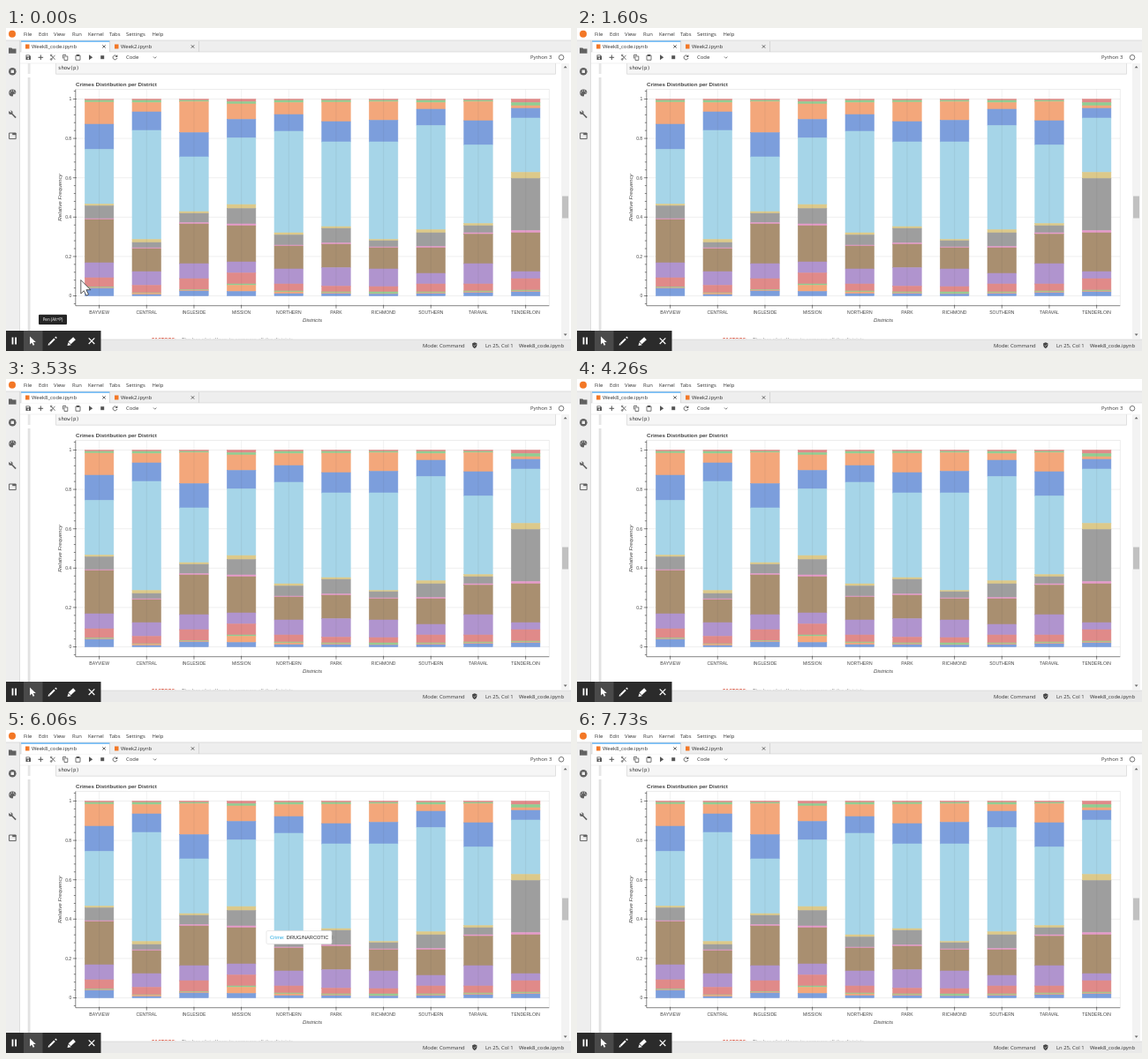
Animation, 640 px wide and 366 px high, one loop 8 s. Source, as an HTML page:

```html
<!DOCTYPE html>
<html lang="en">
<head>
<meta charset="utf-8">
<title>Crimes Distribution per District</title>
<style>
  html, body { margin: 0; width: 100%; height: 100%; overflow: hidden; background: #fff; }
  svg { display: block; width: 100vw; height: 100vh; }
  text { font: 5.9px "Open Sans", sans-serif; fill: #333; white-space: pre; }
  .chart text { font: 5.05px "Liberation Sans", Arial, sans-serif; fill: #444; }
  .chart .title { font-size: 6.2px; font-weight: bold; }
  .chart .axis { font-size: 6.2px; font-style: italic; text-anchor: middle; }
  .tip text { font: 5.65px "Liberation Sans", Arial, sans-serif; }
  .code { font: 5.7px "DejaVu Sans Mono", monospace; }
</style>
</head>
<body>
<svg id="stage" viewBox="0 0 640 366" preserveAspectRatio="none"></svg>
<script>
const stage = document.getElementById('stage');

function add(parent, tag, attrs = {}, content) {
  const node = document.createElementNS('http://www.w3.org/2000/svg', tag);
  for (const key in attrs) node.setAttribute(key, attrs[key]);
  if (content !== undefined) node.textContent = content;
  return parent.appendChild(node);
}
const group = (attrs, parent = stage) => add(parent, 'g', attrs);
const rect = (parent, x, y, width, height, fill, more) =>
  add(parent, 'rect', { x, y, width, height, fill, ...more });
const text = (parent, x, y, content, more) => add(parent, 'text', { x, y, ...more }, content);
const stroke = (parent, d, color = '#555', width = 1) =>
  add(parent, 'path', { d, fill: 'none', stroke: color, 'stroke-width': width });
const fill = (parent, d, color = '#555') => add(parent, 'path', { d, fill: color });
const cross = (parent, x, y, r, color, width) =>
  stroke(parent, `M${x - r} ${y - r}l${2 * r} ${2 * r}m0 ${-2 * r}l${-2 * r} ${2 * r}`, color, width);

function drawWindow() {
  const g = group();
  rect(g, 0, 0, 640, 366, '#fff');
  rect(g, 0, 14, 15.5, 340, '#eee');
  rect(g, 15.5, 14, 624.5, 13, '#eee');
  stroke(g, 'M0 14H640M15.5 14V353M15.5 27H640', '#cfcfcf', .6);

  // Menu and tabs
  add(g, 'circle', { cx: 7, cy: 6.8, r: 4, fill: '#f37726' });
  const menu = { File: 20, Edit: 37, View: 54, Run: 75, Kernel: 93, Tabs: 117, Settings: 136, Help: 165.5 };
  for (const name in menu) text(g, menu[name], 9, name);
  rect(g, 17, 15, 100.5, 12.5, '#fff');
  rect(g, 17, 14.6, 100.5, 1, '#2196f3');
  stroke(g, 'M17 15V27M117.5 15V27M218.5 15V27', '#c4c4c4', .6);
  [['Week8_code.ipynb', 29, 22], ['Week2.ipynb', 130, 123]].forEach(([name, x, icon]) => {
    rect(g, icon, 18.5, 4.5, 5, '#f37726');
    text(g, x, 23.2, name);
  });
  cross(g, 111, 21, 1.7, '#444', .8);
  cross(g, 211.5, 21, 1.7, '#444', .8);

  // Toolbar
  fill(g, 'M22.5 30.5h4l1.5 1.5v4h-5.5z');
  rect(g, 23.4, 31.2, 2.8, 1.3, '#fff');
  add(g, 'circle', { cx: 25.2, cy: 34.5, r: .9, fill: '#fff' });
  stroke(g, 'M36.5 33.3h5.6M39.3 30.5v5.6');
  stroke(g, 'M51 30.8l4.5 5M55.5 30.8l-4.5 5', '#555', .8);
  for (const y of [31, 35.5]) add(g, 'circle', { cx: 51.2, cy: y, r: .9, fill: 'none', stroke: '#555', 'stroke-width': .7 });
  stroke(g, 'M64.5 34.5v-4h3.5M66 32h3.8v4.5H66z', '#555', .8);
  stroke(g, 'M79 31h5v5.3h-5z', '#555', .8);
  rect(g, 80, 30, 3, 2, '#555');
  fill(g, 'M94 30.3l4.2 3-4.2 3z');
  rect(g, 107.2, 31.2, 4, 4, '#555');
  stroke(g, 'M125.5 32.1a2.4 2.4 0 1 0 .3 2', '#555', .9);
  fill(g, 'M126.3 30.3v2.6h-2.6z');
  text(g, 136, 35.3, 'Code');
  stroke(g, 'M167 32.5l1.7 1.7 1.7-1.7', '#555', .8);
  text(g, 594, 35.3, 'Python 3');
  add(g, 'circle', { cx: 629, cy: 33.3, r: 2.8, fill: 'none', stroke: '#555', 'stroke-width': .8 });

  // Sidebar
  fill(g, 'M3 22.5h3.3l1 1h4.2v5.2H3z', '#616161');
  add(g, 'circle', { cx: 7.3, cy: 49.3, r: 4.3, fill: '#616161' });
  rect(g, 5.6, 47.6, 3.4, 3.4, '#eee');
  fill(g, 'M7.3 69.5a4 4 0 1 0 0 8q1.1-.2.7-1.3-.4-1.2 1-1.2 2.4 0 2.4-2.2-.4-3.3-4.1-3.3z', '#616161');
  for (const [cx, cy] of [[4.8, 73], [6.2, 71.2], [8.6, 71.2], [10, 73]]) add(g, 'circle', { cx, cy, r: .6, fill: '#eee' });
  stroke(g, 'M6.3 96.8l4.8 4.8', '#616161', 1.6);
  add(g, 'circle', { cx: 5.3, cy: 95.8, r: 2.3, fill: '#616161' });
  fill(g, 'M3 93.4l2.4 2.4.9-.9-2-2z', '#eee');
  stroke(g, 'M3.6 119h7.6v6.6H3.6z', '#616161');
  rect(g, 7.2, 119, 4, 2.2, '#616161');

  // Notebook cells
  rect(g, 56.5, 40, 566, 12.2, '#f6f6f6');
  stroke(g, 'M56.5 40V52.2H622.5V40', '#d4d4d4', .7);
  stroke(g, 'M16 40H628', '#e2e2e2', .5);
  text(g, 59, 47, 'show(p)', { class: 'code' });
  rect(g, 24.7, 40, 2.8, 12, '#e6e6e6');
  rect(g, 24.7, 56, 2.8, 288, '#e2e2e2');
  const clip = add(g, 'clipPath', { id: 'cut' });
  rect(clip, 16, 345, 612, 7.3);
  const cut = group({ 'clip-path': 'url(#cut)' }, g);
  text(cut, 165, 355.2, 'FACTORS:', { style: 'font-weight:bold;fill:#d9543f' });
  text(cut, 199, 355.2, 'The bar plot allows to compare all the districts', { style: 'fill:#777' });

  // Scrollbar
  rect(g, 629, 40, 9, 312, '#f3f3f3');
  rect(g, 630, 190.5, 7, 25, '#c1c1c1');
  fill(g, 'M631.7 45.2h3.8l-1.9-2.2z', '#666');
  fill(g, 'M631.7 346.5h3.8l-1.9 2.2z', '#666');

  // Status bar
  rect(g, 0, 353, 640, 13, '#e9e9e9');
  stroke(g, 'M0 353H640', '#cfcfcf', .6);
  text(g, 472, 362, 'Mode: Command');
  fill(g, 'M530.8 356.3l2.6 1v2.4q-.3 2.2-2.6 3.3-2.3-1.1-2.6-3.3v-2.4z', '#444');
  stroke(g, 'M529.6 359.6l1 1 1.6-2', '#e9e9e9', .6);
  text(g, 543, 362, 'Ln 25, Col 1');
  text(g, 581, 362, 'Week8_code.ipynb');
}

const palette = {
  red: '#e08a89', green: '#90cd92', orange: '#f3a77b', blue: '#7c9edc', sky: '#a6d5e8',
  khaki: '#dcc98a', gray: '#9e9e9e', pink: '#e59bcb', brown: '#a98f70', purple: '#b094ce'
};
const layers = 'red green orange blue sky khaki gray pink brown purple red green orange blue'.split(' ');
// Lower edge of each layer, top to bottom; the last layer ends at the zero line.
const districts = {
  BAYVIEW: [82, 84, 109, 137.5, 199.5, 201.5, 216, 217, 266, 283, 293.5, 294.5, 295],
  CENTRAL: [82, 84.5, 95, 116, 239.5, 243, 249, 250, 276, 291.5, 300, 300.6, 302],
  INGLESIDE: [82, 83.3, 118.5, 146, 208, 210, 220.5, 222, 267, 284, 296.5, 297, 298],
  MISSION: [83.5, 86, 103.5, 124.5, 200, 204.5, 222, 224, 265, 277.5, 290, 291.5, 298.5],
  NORTHERN: [82, 84.5, 98, 117, 232, 234.5, 246, 247, 273, 290, 298, 299, 301],
  PARK: [82, 84, 106, 129, 225, 227, 243.5, 245, 271.5, 292.5, 299, 300, 301],
  RICHMOND: [82, 83.5, 104.5, 129, 239.5, 241, 248, 249, 273, 293, 299, 301, 301.5],
  SOUTHERN: [82, 84.5, 92, 110.5, 228.5, 232, 247.5, 249, 278, 290, 299, 300, 301],
  TARAVAL: [82, 83.3, 105, 132.5, 221.5, 224, 232, 233.5, 267, 290, 298, 299, 300],
  TENDERLOIN: [84.5, 88, 91, 102, 163.5, 170.5, 229.5, 232, 276, 284, 297, 298, 299]
};

function drawChart() {
  const g = group({ class: 'chart' });
  const zero = 303.5, one = 80.5, left = 78.8, top = 69.5, right = 615.3, bottom = 314.7;
  const yAt = value => zero + (one - zero) * value;
  text(g, 79, 65.6, 'Crimes Distribution per District', { class: 'title' });
  for (let i = 0; i <= 5; i++) stroke(g, `M${left} ${yAt(i / 5)}H${right}`, '#e5e5e5', .6);

  Object.entries(districts).forEach(([name, edges], i) => {
    const x = 105.6 + 53.67 * i;
    let y = one;
    [...edges, zero].forEach((edge, k) => {
      const color = palette[layers[k]];
      rect(g, x - 16.3, y, 32.6, edge - y, color, { stroke: color, 'stroke-width': .5 });
      y = edge;
    });
    stroke(g, `M${x} ${top}V${bottom}`, 'rgba(70,70,70,.13)', .6);
    stroke(g, `M${x} ${bottom - 1}v4`, '#333', .6);
    text(g, x, 323.8, name, { 'text-anchor': 'middle' });
  });

  stroke(g, `M${left} ${top}H${right}V${bottom}`, '#e0e0e0', .6);
  stroke(g, `M${left} ${top}V${bottom}H${right}`, '#333', .6);
  for (let i = -1; i <= 26; i++) {
    const y = yAt(i / 25), major = i % 5 === 0;
    stroke(g, `M${left + (major ? 1 : 0)} ${y}H${left - (major ? 3 : 2)}`, '#333', .6);
    if (major) text(g, 74.2, y + 1.8, String(i / 25), { 'text-anchor': 'end' });
  }
  text(g, 347, 332.7, 'Districts', { class: 'axis' });
  text(g, 0, 0, 'Relative Frequency', { class: 'axis', transform: 'translate(63.3 192) rotate(-90)' });
}

function drawRecorder() {
  const g = group();
  rect(g, 0, 343, 107.5, 23, '#2b2b2b');
  rect(g, 20, 343, 21.5, 23, '#4a4a4a');
  rect(g, 6.6, 350.5, 1.8, 8, '#fff');
  rect(g, 10.2, 350.5, 1.8, 8, '#fff');
  fill(g, 'M27 349.5v9l2.2-2 1.5 3.2 1.6-.8-1.5-3h3z', '#fff');
  stroke(g, 'M49.5 357.8l5.5-5.5', '#fff', 2);
  fill(g, 'M47.6 359.7l.5-2.6 2 2z', '#fff');
  fill(g, 'M55.2 350.4l1.2-1 1.5 1.5-1 1.2z', '#fff');
  stroke(g, 'M72 356.8l5.5-5', '#fff', 4);
  fill(g, 'M69.5 360l1-3.8 3.2 3z', '#fff');
  cross(g, 97, 354.7, 3.3, '#fff', 1.2);
}

// A hover label whose arrow tip sits at the group's origin.
function hoverLabel(value, width, side) {
  const g = group({ class: 'tip' });
  const x = side > 0 ? 4 : -4 - width;
  rect(g, x, -7.5, width, 15, '#fff', { rx: 1.5, stroke: '#dcdcdc', 'stroke-width': .6 });
  fill(g, `M0 0l${4 * side}-2.7v5.4z`, '#999');
  text(g, x + 4, 2, 'Crime:', { style: 'fill:#26aae1' });
  text(g, x + 22.8, 2, value, { style: 'fill:#222' });
  return g;
}

drawWindow();
drawChart();
drawRecorder();
const theft = hoverLabel('LARCENY/THEFT', 73, 1);
const narcotic = hoverLabel('DRUG/NARCOTIC', 74, -1);

const penHint = group();
rect(penHint, 37, 324.7, 32, 11.3, '#252525', { rx: 1 });
text(penHint, 53, 332.1, 'Pen (Alt+P)', { 'text-anchor': 'middle', style: 'fill:#fff;font-size:4.5px' });
const cursor = group();
add(cursor, 'path', { d: 'M0 0v15.5l3.5-3.3 2.6 5.5 2.6-1.2-2.6-5.3h5z', fill: '#fff', stroke: '#333', 'stroke-width': .8 });

const progress = (t, from, to) => Math.min(1, Math.max(0, (t - from) / (to - from)));
const easeOut = p => 1 - (1 - p) ** 3;
const show = (node, on) => node.setAttribute('visibility', on ? 'visible' : 'hidden');
const place = (node, x, y) => node.setAttribute('transform', `translate(${x} ${y})`);

function render(t) {
  show(cursor, t < 60);
  place(cursor, 84.8, 285.5);
  show(penHint, t < 200);
  penHint.setAttribute('opacity', 1 - progress(t, 60, 200));

  const enter = easeOut(progress(t, 1800, 2060)), leave = progress(t, 2530, 2860);
  show(theft, t >= 1800 && t < 2860);
  place(theft, 152 + 9 * enter + 10 * leave, 196 - 18.5 * enter);

  const settle = easeOut(progress(t, 5860, 6060));
  show(narcotic, t >= 5860 && t < 7200);
  place(narcotic, 364 + 9 * settle, 239 - 4 * settle);
}

function frame(now) {
  render(now % 8000);
  requestAnimationFrame(frame);
}
render(0);
requestAnimationFrame(frame);
</script>
</body>
</html>
```
